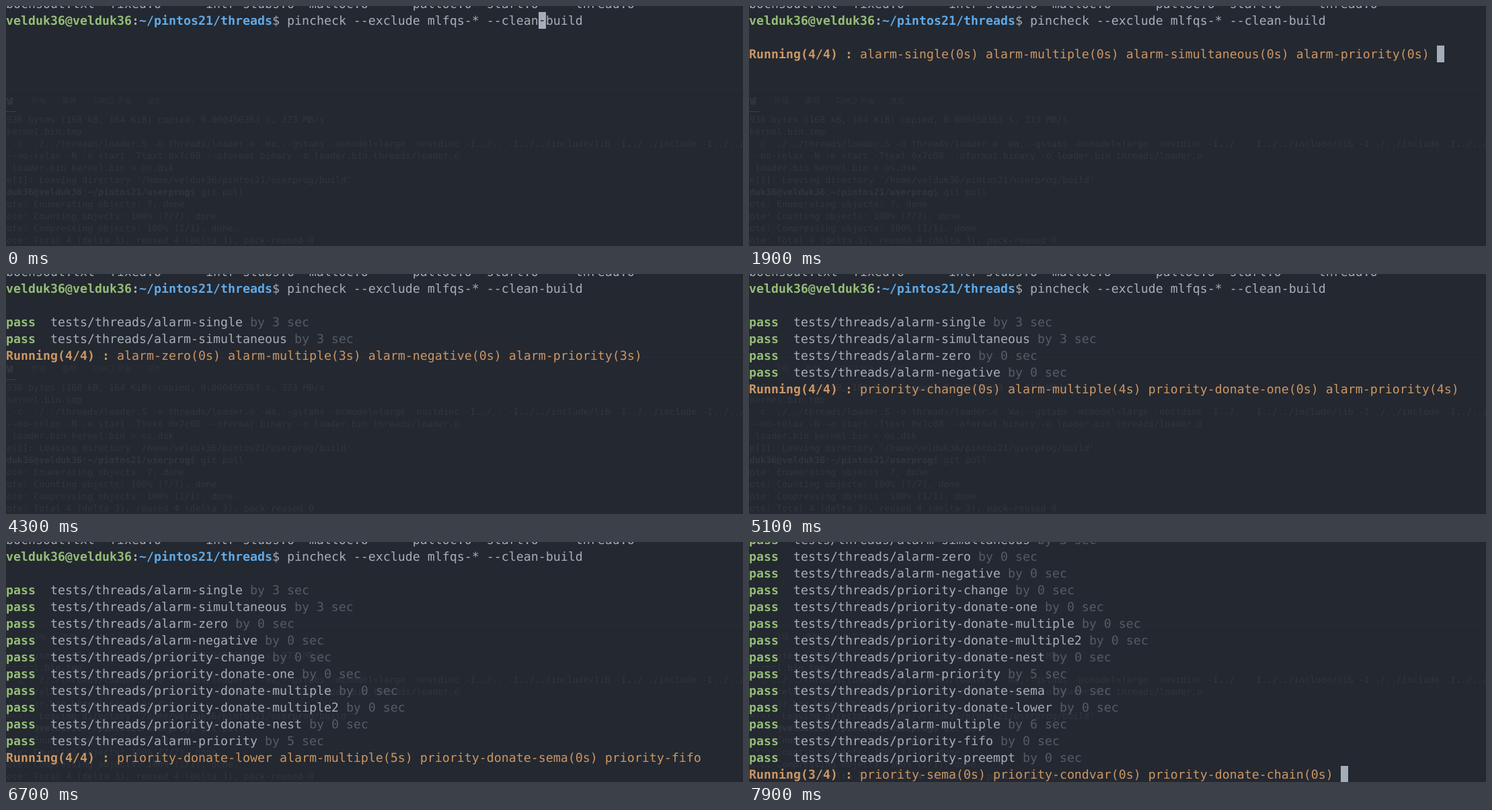
Recreate the animation shown at these times as an HTML page. Size 1096x358 px, loop 8 s.

```html
<!DOCTYPE html>
<html lang="en">
<head>
<meta charset="utf-8">
<title>pincheck</title>
<style>
html, body { margin: 0; width: 100%; height: 100%; overflow: hidden; background: #242830; }
body { position: relative; text-rendering: geometricPrecision; }
div { white-space: pre; }
#term, #ghost { position: absolute; left: 0; font-family: "DejaVu Sans Mono", monospace; }
#term { top: -15px; font-size: 18.271px; line-height: 25px; color: #abb2bf; opacity: .97; }
#term div { height: 25px; }
#ghost { top: 162px; left: -23px; font-size: 13.32px; line-height: 18px; color: #31363f; }
#tabs { position: absolute; top: 124px; left: 0; width: 100%; border-top: 1px solid #292d36;
  font: 12px/34px "Noto Sans CJK KR", "Noto Sans CJK", sans-serif; color: #2f343d; }
#tabs span { position: absolute; top: 0; }
#tabs hr { position: absolute; left: 0; top: 32px; width: 16px; height: 1px; margin: 0; border: 0; background: #3a3f48; }
.user, .pass { color: #98c379; font-weight: bold; }
.pass { background: #242830; }
.path { color: #61afef; font-weight: bold; }
.run { color: #d19a66; }
.time { color: #575d69; }
i { display: inline-block; position: relative; top: -1px; width: 11px; height: 25px; vertical-align: top;
  font-style: normal; background: #abb2bf; color: #242830; }
</style>
</head>
<body>
<div id="tabs"><span style="left:-22px;color:#363b44;font-weight:bold">터미널</span><span style="left:37px">문제</span><span style="left:83px">출력</span><span style="left:129px">디버그 콘솔</span><span style="left:210px">포트</span><hr></div>
<div id="ghost">167936 bytes (168 kB, 164 KiB) copied, 0.000450363 s, 373 MB/s
rm kernel.bin.tmp
gcc -c ../../threads/loader.S -o threads/loader.o -Wa,--gstabs -mcmodel=large -nostdinc -I../.. -I../../include/lib -I../../include -I../../..
ld --no-relax -N -e start -Ttext 0x7c08 --oformat binary -o loader.bin threads/loader.o
cat loader.bin kernel.bin &gt; os.dsk
make[1]: Leaving directory '/home/velduk36/pintos21/userprog/build'
<b>velduk36@velduk36</b>:<b>~/pintos21/userprog</b>$ git pull
remote: Enumerating objects: 7, done.
remote: Counting objects: 100% (7/7), done.
remote: Compressing objects: 100% (1/1), done.
remote: Total 4 (delta 3), reused 4 (delta 3), pack-reused 0</div>
<div id="term"></div>
<script>
const LOOP = 8000, ROWS = 15;
const term = document.getElementById('term');

// finished tests in order, with seconds taken
const tests = [
  ['alarm-single', 3], ['alarm-simultaneous', 3], ['alarm-zero', 0], ['alarm-negative', 0],
  ['priority-change', 0], ['priority-donate-one', 0], ['priority-donate-multiple', 0],
  ['priority-donate-multiple2', 0], ['priority-donate-nest', 0], ['alarm-priority', 5],
  ['priority-donate-sema', 0], ['priority-donate-lower', 0], ['alarm-multiple', 6],
  ['priority-fifo', 0], ['priority-preempt', 0]
];

const alarms = s =>
  `alarm-single(${s}s) alarm-multiple(${s}s) alarm-simultaneous(${s}s) alarm-priority(${s}s)`;

// start time, tests passed, running tests, cursor shown
const steps = [
  [0, 0, 'typing', 1],
  [400, 0, 'typing', 0],
  [500, 0, 'typing', 1],
  [800, 0, 'entered', 1],
  [1100, 0, alarms(0), 0],
  [1900, 0, alarms(0), 1],
  [2100, 0, alarms(1), 1],
  [2500, 0, alarms(1), 0],
  [3000, 0, alarms(1), 1],
  [3200, 0, alarms(2), 1],
  [3700, 0, alarms(2), 0],
  [4100, 0, alarms(3), 0],
  [4200, 0, alarms(3), 1],
  [4300, 2, 'alarm-zero(0s) alarm-multiple(3s) alarm-negative(0s) alarm-priority(3s)', 0],
  [4900, 4, 'priority-change(0s) alarm-multiple(3s) priority-donate-one alarm-priority(3s)', 0],
  [5100, 4, 'priority-change(0s) alarm-multiple(4s) priority-donate-one(0s) alarm-priority(4s)', 0],
  [5500, 6, 'priority-donate-multiple(0s) alarm-multiple(4s) priority-donate-multiple2(0s) alarm-priority(4s)', 0],
  [6100, 7, 'priority-donate-nest(0s) alarm-multiple(5s) priority-donate-multiple2(0s) alarm-priority(5s)', 0],
  [6300, 8, 'priority-donate-nest(0s) alarm-multiple(5s) priority-donate-sema(0s) alarm-priority(5s)', 0],
  [6700, 10, 'priority-donate-lower alarm-multiple(5s) priority-donate-sema(0s) priority-fifo', 0],
  [6900, 11, 'priority-donate-lower(0s) alarm-multiple(5s) priority-preempt priority-fifo(0s)', 1],
  [7100, 11, 'priority-donate-lower(0s) alarm-multiple(6s) priority-preempt(0s) priority-fifo(0s)', 1],
  [7300, 11, 'priority-donate-lower(0s) alarm-multiple(6s) priority-preempt(0s) priority-fifo(0s)', 0],
  [7500, 14, 'priority-sema(0s) priority-condvar(0s) priority-preempt(0s) priority-donate-chain(0s)', 0],
  [7700, 15, 'priority-sema(0s) priority-condvar(0s) priority-donate-chain(0s)', 0],
  [7900, 15, 'priority-sema(0s) priority-condvar(0s) priority-donate-chain(0s)', 1]
];

const span = (cls, text) => `<span class="${cls}">${text}</span>`;

function screen([, passed, running, cursor]) {
  const typing = running === 'typing';
  const block = cursor ? '<i></i>' : '';
  const lines = [
    'bochsout.txt  fixed.o      intr-stubs.o  malloc.o      palloc.o  start.o     thread.o',
    span('user', 'velduk36@velduk36') + '<b>:</b>' + span('path', '~/pintos21/threads') +
      '$ pincheck --exclude mlfqs-* --clean' + (typing && cursor ? '<i>-</i>' : '-') + 'build'
  ];
  if (running === 'entered') lines.push(block);
  else if (!typing) {
    lines.push('');
    for (const [name, sec] of tests.slice(0, passed))
      lines.push(span('pass', 'pass') + `  tests/threads/${name} ` + span('time', `by ${sec} sec`));
    const count = running.split(' ').length;
    lines.push(span('run', `<b>Running(${count}/4) :</b> ${running} `) + block);
  }
  return lines.slice(-ROWS).map(line => `<div>${line}</div>`).join('');
}

let shown;
function frame() {
  const t = performance.now() % LOOP;
  const step = steps.findLast(s => s[0] <= t);
  if (step !== shown) {
    term.innerHTML = screen(step);
    shown = step;
  }
  requestAnimationFrame(frame);
}
frame();
</script>
</body>
</html>
```
